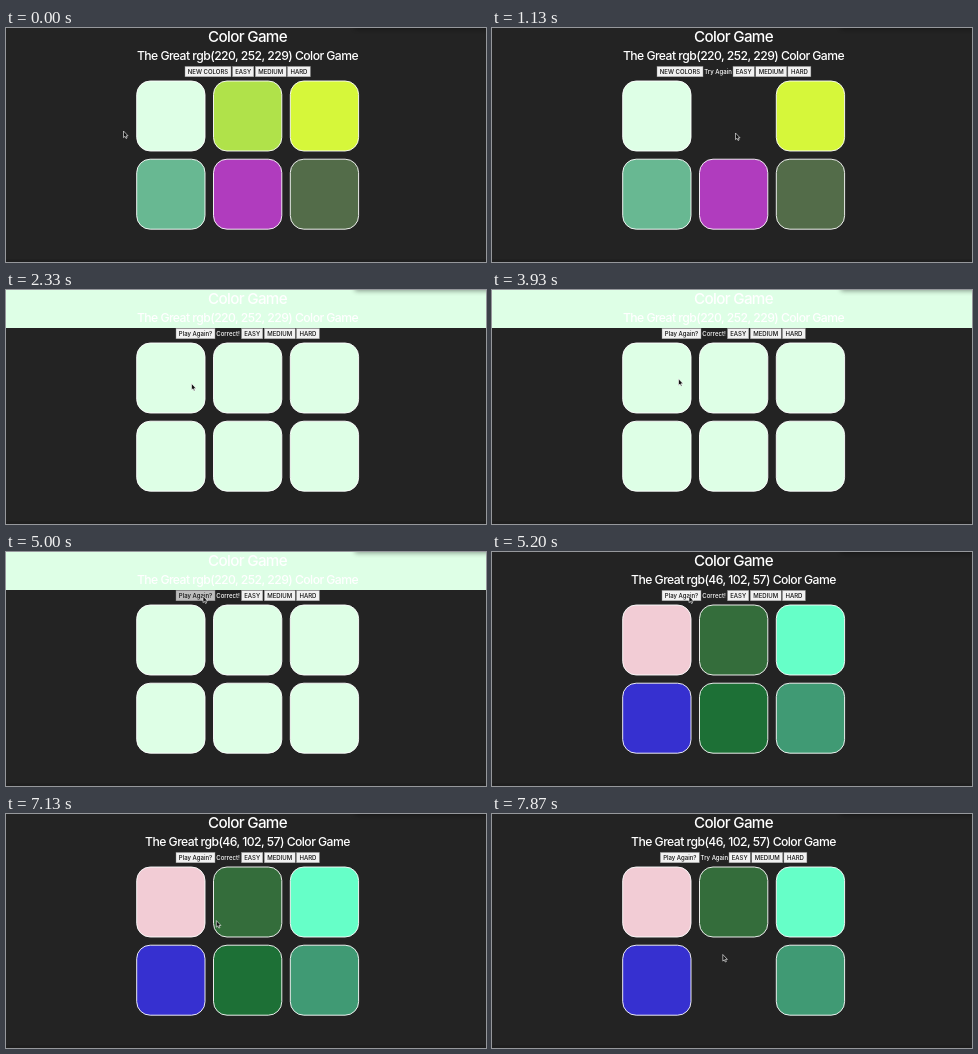
These frames come from a looping animation (480 px wide and 234 px high, 8000 ms). An HTML page:

```html
<!DOCTYPE html>
<html lang="en">
<head>
<meta charset="utf-8">
<title>Color Game</title>
<style>
  html, body { margin: 0; width: 100%; height: 100%; overflow: hidden; background: #232323; }
  svg { display: block; width: 100vw; height: 100vh; }
  text { font-family: Inter, Roboto, sans-serif; fill: #fff; }
  .title { font-weight: 500; letter-spacing: -.045em; text-anchor: middle; }
  .label { font-size: 6px; font-weight: 500; }
  .button { text-anchor: middle; fill: #111; }
</style>
</head>
<body>
<svg viewBox="0 0 480 234">
  <defs>
    <filter id="soft" x="-20%" y="-200%" width="140%" height="500%">
      <feGaussianBlur stdDeviation="2.5"/>
    </filter>
  </defs>
  <g id="page"></g>
  <rect x="349" y="-10" width="140" height="11" opacity=".4" filter="url(#soft)"/>
  <path id="cursor" d="M0 0V6.6L1.5 5.3L2.5 7.5L3.6 7L2.6 4.9H4.6Z"
        fill="#111" stroke="#fff" stroke-width=".6" stroke-linejoin="round"/>
</svg>
<script>
const LOOP = 8000;
const MINT = '#deffe6';
const first = [MINT, '#b0e24a', '#d6f73a', '#68b892', '#b03cbe', '#536c49'];
const second = ['#f2ccd5', '#346d3b', '#66ffc8', '#3630d0', '#1d7036', '#409a74'];
const without = (colors, i) => colors.map((c, k) => k === i ? null : c);

// left: start of the first button; easy: start of the difficulty buttons
const start = { at: 0, rgb: '220, 252, 229', tiles: first, reset: 'NEW COLORS', left: 179, width: 46, msg: '', easy: 226.5 };
const miss = { ...start, at: 1070, tiles: without(first, 1), left: 165, msg: 'Try Again', easy: 241 };
const win = { ...start, at: 2330, tiles: Array(6).fill(MINT), header: MINT,
  reset: 'Play Again?', left: 170, width: 39, msg: 'Correct!', easy: 235.5 };
const press = { ...win, at: 5000, pressed: true };
const next = { ...win, at: 5200, rgb: '46, 102, 57', tiles: second, header: null };
const missAgain = { ...next, at: 7870, tiles: without(second, 4), left: 168.3, msg: 'Try Again', easy: 237 };
const states = [start, miss, win, press, next, missAgain];

// pointer: time, x, y
const path = [
  [0, 117.5, 103], [70, 118, 103], [470, 184, 99], [870, 243.5, 105],
  [1530, 243.5, 105], [1720, 251, 124], [1990, 194, 91], [2130, 185.5, 93.5],
  [3870, 185.5, 93.5], [4200, 191, 68], [4530, 197, 44],
  [6270, 197, 44], [6600, 193, 60], [7070, 205, 93], [7130, 210.3, 106.5],
  [7600, 230.8, 140.5], [LOOP, 230.8, 140.5]
];

const button = (x, w, text, fill = '#f1f1f1') =>
  `<rect x="${x}" y="38.4" width="${w}" height="10.4" fill="${fill}" stroke="#8a8a8a" stroke-width=".4"/>
   <text class="label button" x="${x + w / 2}" y="45.8">${text}</text>`;

const tile = (color, i) => color
  ? `<rect x="${130.7 + i % 3 * 76.8}" y="${53 + (i > 2) * 78.2}" width="68.3" height="70"
      rx="13.5" fill="${color}" stroke="#fff" stroke-width=".9"/>`
  : '';

function page(s) {
  return `<rect width="480" height="234" fill="#232323"/>
    <rect y="231.5" width="480" height="2.5" fill="#1f1f1f"/>
    ${s.header ? `<rect width="480" height="38" fill="${s.header}"/>` : ''}
    <text class="title" x="241.5" y="14.3" font-size="15.2">Color Game</text>
    <text class="title" x="241.5" y="32.2" font-size="12.2">The Great rgb(${s.rgb}) Color Game</text>
    ${button(s.left, s.width, s.reset, s.pressed ? '#bdbdbd' : undefined)}
    <text class="label" x="${s.left + s.width + 1.3}" y="45.8">${s.msg}</text>
    ${button(s.easy, 21.3, 'EASY')}
    ${button(s.easy + 22.8, 30.9, 'MEDIUM')}
    ${button(s.easy + 54.9, 23, 'HARD')}
    ${s.tiles.map(tile).join('')}`;
}

function pointerAt(t) {
  const i = path.findIndex(p => p[0] > t);
  const [t0, x0, y0] = path[i - 1], [t1, x1, y1] = path[i];
  const k = (t - t0) / (t1 - t0);
  return [x0 + (x1 - x0) * k, y0 + (y1 - y0) * k];
}

const pageEl = document.getElementById('page');
const cursor = document.getElementById('cursor');
let shown;

function draw(now) {
  const t = now % LOOP;
  const state = states.findLast(s => s.at <= t);
  if (state !== shown) {
    pageEl.innerHTML = page(state);
    shown = state;
  }
  cursor.setAttribute('transform', `translate(${pointerAt(t)})`);
}

const begin = performance.now();
function tick() {
  draw(performance.now() - begin);
  requestAnimationFrame(tick);
}
tick();
</script>
</body>
</html>
```
